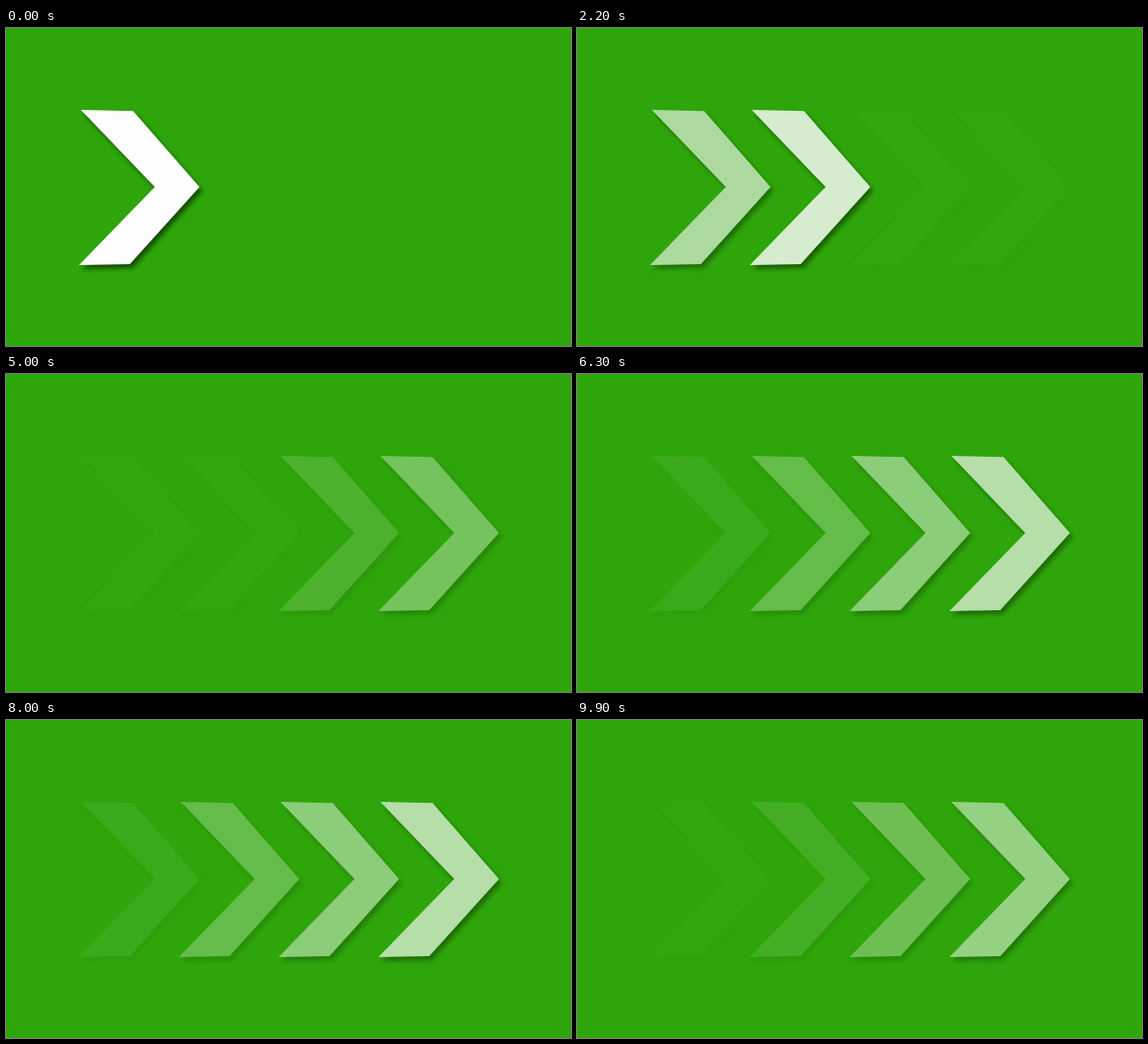
Write an HTML page that moves like this. It is 600 px wide and 338 px high and loops after 10 s.

```html
<!DOCTYPE html>
<html lang="en">
<head>
<meta charset="utf-8">
<title>Arrows</title>
<style>
  html, body { margin: 0; width: 100%; height: 100%; overflow: hidden; background: #2ea50a; }
  svg { display: block; width: 100%; height: 100%; }
  .arrow { fill: #fdfdfd; opacity: 0; filter: drop-shadow(3px 4px 2.5px rgba(0, 0, 0, .55)); }
</style>
</head>
<body>
<svg viewBox="0 0 600 338">
  <defs>
    <path id="chevron" d="M79.5 87 L135 88.3 L205.5 169 L131.5 251 L77.5 252 L158 169 Z"/>
  </defs>
  <use class="arrow" href="#chevron" style="opacity: 1"/>
  <use class="arrow" href="#chevron" x="106"/>
  <use class="arrow" href="#chevron" x="212"/>
  <use class="arrow" href="#chevron" x="318"/>
</svg>
<script>
  const LOOP = 10000, STEP = 100;
  const PERIOD = 1700, STAGGER = 252, FADE = 1280;
  const GHOST = 0.012;
  const arrows = document.querySelectorAll('.arrow');
  const start = performance.now();

  // Each arrow flashes on, then fades linearly to a faint ghost.
  function opacityAt(time, index) {
    const age = time - index * STAGGER;
    if (age < 0) return 0;
    return Math.max(GHOST, 1 - (age % PERIOD) / FADE);
  }

  function draw() {
    const elapsed = Math.max(0, performance.now() - start) % LOOP;
    const time = Math.floor(elapsed / STEP) * STEP;
    arrows.forEach((arrow, i) => { arrow.style.opacity = opacityAt(time, i); });
    requestAnimationFrame(draw);
  }
  draw();
</script>
</body>
</html>
```
